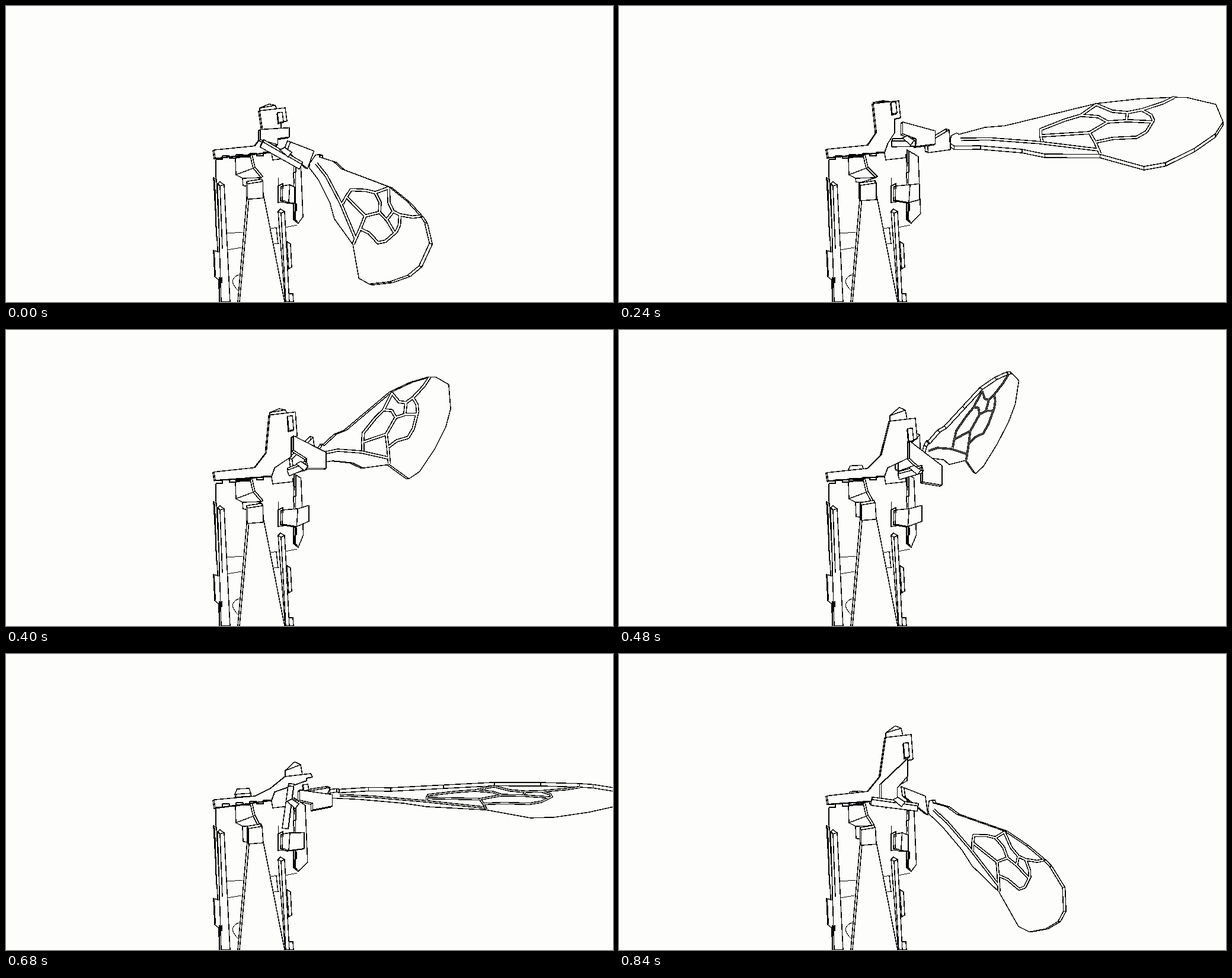
Write an HTML page that moves like this. It is 1024 by 500 pixels and loops after 0.88 s.

```html
<!DOCTYPE html>
<html lang="en">
<head>
<meta charset="utf-8">
<title>Flapping wing mechanism</title>
<style>
  html, body { margin: 0; width: 100%; height: 100%; overflow: hidden; background: #fdfdfb; }
  svg { display: block; width: 100vw; height: 100vh; }
  path { fill: #fdfdfb; stroke: #000; stroke-width: 1.5; stroke-linejoin: round; shape-rendering: crispEdges; }
  .line { fill: none; }
  .thin { fill: none; stroke-width: 1; }
  .bold { fill: none; stroke-width: 2; }
</style>
</head>
<body>
<svg id="stage" viewBox="0 0 1024 500"></svg>
<script>
const LOOP = 880, STEP = 40;
const TIMES = [0, 120, 240, 320, 480, 680, 840];
const { cos, sin, tanh, PI } = Math;
const stage = document.getElementById('stage');

function addPath(className = '', d = '') {
  const path = document.createElementNS('http://www.w3.org/2000/svg', 'path');
  path.setAttribute('class', className);
  path.setAttribute('d', d);
  return stage.appendChild(path);
}

const toPoints = text => text.split(' ').map(p => p.split(',').map(Number));
const line = points => 'M' + points.map(p => p.map(v => v.toFixed(1))).join('L');
const shape = points => line(points) + 'Z';
const shift = (points, dx, dy) => points.map(([x, y]) => [x + dx, y + dy]);
const ribs = (points, dx, dy) => points.map(p => line([p, [p[0] + dx, p[1] + dy]])).join('');
const radians = degrees => degrees * PI / 180;

// A smooth periodic curve through one value per key time.
function track(...values) {
  const n = TIMES.length;
  const key = j => {
    const k = (j + n) % n;
    return [TIMES[k] + Math.floor(j / n) * LOOP, values[k]];
  };
  return t => {
    const i = TIMES.findLastIndex(time => time <= t);
    const [[ta, a], [tb, b], [tc, c], [td, d]] = [i - 1, i, i + 1, i + 2].map(key);
    const span = tc - tb, s = (t - tb) / span;
    const m = (c - a) / (tc - ta) * span, o = (d - b) / (td - tb) * span;
    return b + s * (m + s * (3 * (c - b) - 2 * m - o + s * (2 * (b - c) + m + o)));
  };
}

const motion = {
  rootX: track(523, 556, 567, 552, 517, 553, 528),
  rootY: track(262, 253, 228, 219, 203, 235, 258),
  stroke: track(57.6, 9.3, -29.9, -47.3, -70.5, -5.4, 54.9),
  reach: track(334, 390, 427, 437, 414, 417, 331),
  lobeX: track(-104, -151, -51, -20, -56, -83, -42),
  lobeY: track(105, 77, 117, 155, 168, 52, 112),
  hornX: track(428, 428, 429, 433, 457, 471, 450),
  hornY: track(177, 187, 165, 142, 154, 207, 141),
  linkLean: track(3, 28, 15, 9, 42, 8, 42),
  barTurn: track(30, 10, 0, -30, -15, -82, 8)
};

function poseAt(t) {
  const pose = { phase: 2 * PI * t / LOOP };
  for (const name in motion) pose[name] = motion[name](t);
  pose.lift = tanh(3 * cos(pose.phase - 1.45)); // +1 crank down, -1 crank up
  pose.rise = pose.hornY - 165;
  return pose;
}

// A moving plate: corners from the pose, with optional depth and inner edges.
const updates = [];
function addPart(corners, { depth, edges = [] } = {}) {
  const back = depth && addPath(), front = addPath();
  updates.push(pose => {
    const points = corners(pose);
    if (back) back.setAttribute('d', shape(shift(points, ...depth)) + ribs(points, ...depth));
    front.setAttribute('d', shape(points) + edges.map(e => line(e.map(i => points[i]))).join(''));
  });
}

// Frame behind the moving parts
addPath('thin', 'M354 258L355 300M373 384L399 382M373 412L397 408M446 376L458 374M471 374L491 370' +
  'M452 402L461 401M393 454Q383 457 382 466Q385 475 392 481M459 290V303');
addPath('line', 'M453 234L448 248L450 260L486 256');
addPath('line', 'M407 316L391 500M410 322L394 500M433 312L470 500');
addPath('', 'M350 290L355 293L360 390L360 500L357 410Z');
addPath('', 'M350 413L361 416L363 466L352 457Z');
addPath('', 'M357 300L361 297L368 302L378 500H363Z');
addPath('line', 'M357 300L361 304L368 302M361 304L365 410M360 458V500');
addPath('bold', 'M354 260V290M352 293L355 390M351 414L353 456M364 458V468');
addPath('', 'M474 398L480 402L482 441L477 444Z');
addPath('', 'M477 486L484 486L485 500H478Z');
addPath('', 'M459 347L463 343L470 347L478 500H471Z');
addPath('line', 'M459 347L464 350L470 347M464 350L472 500M456 375L459 402');

// Rear tab, seen above the plate while the crank is up
addPart(({ lift }) => {
  const y = 235 + 8 * lift;
  return [[386, y + 10], [390, y + 1], [410, y], [413, y + 8]];
}, { depth: [1, 5] });

// Lower hinge plate
addPart(({ phase }) => {
  const x = 505 - 4 * cos(2 * phase), y = 351 + 5 * cos(phase);
  return [[489, 245], [x - 4, y - 96], [x, y], [493, 367], [488, 363]];
}, { depth: [-3, -2] });
addPath('bold', 'M484 250L485 263L489 266V280L485 282L486 300M487 331L490 335V345L487 348V361L492 364');

// Slider and its slot
addPath('', 'M459 304L467 300V331L459 332Z');
addPart(({ phase }) => {
  const end = 502 - 12 * cos(phase) - 3 * cos(2 * phase);
  const corner = 485 - 8 * cos(phase + 0.7), y = 301 + 5 * cos(phase);
  return [[467, 304], [corner, 302], [end, y], [end, y + 27], [corner - 2, 332], [466, 328]];
}, { depth: [-3, 1], edges: [[1, 4]] });

// Crank strap, then the head of the middle leg
addPart(({ lift }) => {
  const low = 308 - 10 * lift;
  return [[387, 257], [412, 253], [417, 274], [429 + 4 * lift, 290],
    [408, low], [400, low - 1], [399, 291], [388, 285]];
}, { depth: [3, -2], edges: [[7, 2], [6, 3]] });
addPart(({ lift }) => {
  const y = 298 + 4 * lift, x = 408 - lift;
  return [[x, y + 1], [433 + lift, y - 3], [434, y + 25], [x, y + 27]];
}, { depth: [-2, -4] });

// Hinge block at the wing root, turned along the wing's chord
addPart(({ rootX, rootY, stroke, lobeX, lobeY }) => {
  const x = rootX - 9, y = rootY - 2;
  const cx = (lobeX + 60) / 8, cy = lobeY / 7;
  const farX = x - 37, farY = y - 27 * sin(radians(stroke));
  return [[farX - cx / 2, farY - cy / 2], [x - cx, y - cy],
    [x + cx, y + cy], [farX + cx / 2, farY + cy / 2]];
}, { depth: [-5, -2] });

// Wing: a rigid sheet drawn once and placed by root, tip and lobe
const OUTLINE = toPoints('545,212 552,205 556,208 590,191 618,186 680,158 740,131 798,118 848,112 ' +
  '866,112 909,125 925,163 918,190 893,224 857,257 828,267 762,243 684,246 650,237 590,232 553,234 547,229');
const VEINS = [
  '740,133 722,158 700,170 670,192 672,206 676,219',
  '740,133 765,147 787,149 806,142 834,125 848,112',
  '722,158 747,160 762,171 790,167 824,168',
  '787,149 788,167',
  '806,142 821,153 826,164 820,190 808,203 775,207 752,216',
  '672,206 740,196 747,188 762,171',
  '740,196 751,217 762,242',
  '560,219 600,216 672,221 757,233'
].map(toPoints);
const SQUASH = 3; // the stroke circle is seen as a flat ellipse

function wingPlane({ rootX, rootY, stroke, reach, lobeX, lobeY }) {
  const dx = reach * cos(radians(stroke)), dy = reach * sin(radians(stroke)) / SQUASH;
  return new DOMMatrix([dx, dy, dx + lobeX, dy + lobeY, rootX, rootY]);
}
const flatInverse = wingPlane(poseAt(320)).inverse();
const wingBack = addPath(), wingFront = addPath();
const veinDark = addPath('line'), veinLight = addPath('line');
veinLight.style.stroke = '#fdfdfb';

updates.push(pose => {
  const vx = 5 * cos(pose.phase) ** 3, vy = 6.5 * cos(pose.phase - radians(75));
  const m = wingPlane(pose).multiply(flatInverse);
  const place = points => points.map(([x, y]) =>
    [m.a * x + m.c * y + m.e - vx / 2, m.b * x + m.d * y + m.f - vy / 2]);
  const front = place(OUTLINE);
  wingBack.setAttribute('d', shape(shift(front, vx, vy)) + ribs(front, vx, vy));
  wingFront.setAttribute('d', shape(front));
  const veins = VEINS.map(v => line(place(v))).join('');
  const facing = Math.abs(m.a * m.d - m.b * m.c);
  const width = Math.min(5.6, Math.max(3.6, facing * 9));
  veinDark.setAttribute('d', veins);
  veinLight.setAttribute('d', veins);
  veinDark.style.strokeWidth = width;
  veinLight.style.strokeWidth = width - 3;
});

// Horn cap, showing its peak as the horn leans back
addPart(({ hornX: x, hornY: y, lift }) => {
  const h = 15 - 10 * lift;
  return [[x, y], [x, y - h * 0.4], [x + 16, y - h], [x + 26, y - h * 0.8], [x + 29, y - 3]];
}, { edges: [[1, 3]] });

// Plate with its horn: the plate tips a little as the horn swings
const hornDrop = hornY => (208 - hornY) * 0.55;
addPart(({ hornX: x, hornY: y, rise }) => {
  const drop = hornDrop(y), left = 242 + rise * 0.1;
  return [[353, left + 14], [351, left], [420, 235 + rise * 0.12],
    [434 + (x - 428) * 0.3, 214 + rise * 0.3], [x, y], [x + 43, y - 5],
    [x + 46, y + drop], [x + 36, y + drop + 2], [x + 36, 214], [453, 233], [448, 247]];
}, { depth: [-2, 1] });

// Castellated lower edge of the plate
const teeth = [];
for (let i = 0; i < 8; i++) {
  const x = 354 + i * 11.5, y = 259 - i - (i % 2) * 5;
  teeth.push([x, y], [x + 11, y]);
}
addPath('bold', line(teeth));

// Slot in the horn
addPart(({ hornX, hornY, lift }) => {
  const x = hornX + 30, y = hornY + 6 - 8 * lift, h = 8 + hornDrop(hornY) * 0.4;
  return [[x, y], [x + 8, y - 1], [x + 10, y + h], [x + 2, y + h + 2]];
}, { depth: [-1, 2] });

// Link: a bell-crank plate that turns over around the horn slot
addPart(({ phase, hornX, hornY, linkLean }) => {
  const x = 483 + (hornX - 440) * 0.4, y = 64 + hornY * 0.8;
  const across = 55 * tanh(8 * (0.82 - cos(phase))), down = 16 + linkLean * 0.4;
  const at = (a, b) => [x + a * across, y + a * linkLean + b * down];
  return [at(0, 0), at(1, 0), at(1, 1), at(0.4, 1.6), at(0.4, 1), at(0, 0.9)];
}, { depth: [-3, 2] });

// Push bar and pin
const barCentre = phase => [478 - 14 * cos(phase), 246 + 14 * cos(phase + 1.05)];
addPart(({ phase, barTurn }) => {
  const [x, y] = barCentre(phase), half = 28 + 12 * cos(phase + 0.6);
  const c = cos(radians(barTurn)), s = sin(radians(barTurn));
  return [[-1, -5], [1, -5], [1, 4], [-1, 5]].map(([a, b]) =>
    [x + a * half * c - b * s, y + a * half * s + b * c]);
}, { depth: [1, -4] });
addPart(({ phase }) => {
  const [x, y] = barCentre(phase);
  return [[x - 2, y - 10], [x + 6, y - 14], [x + 18, y - 6], [x + 12, y + 2]];
});

const start = performance.now();
let shown = -1;
function tick(now) {
  const t = Math.floor(Math.max(0, now - start) % LOOP / STEP) * STEP;
  if (t !== shown) {
    shown = t;
    const pose = poseAt(t);
    updates.forEach(update => update(pose));
  }
  requestAnimationFrame(tick);
}
tick(start);
</script>
</body>
</html>
```
